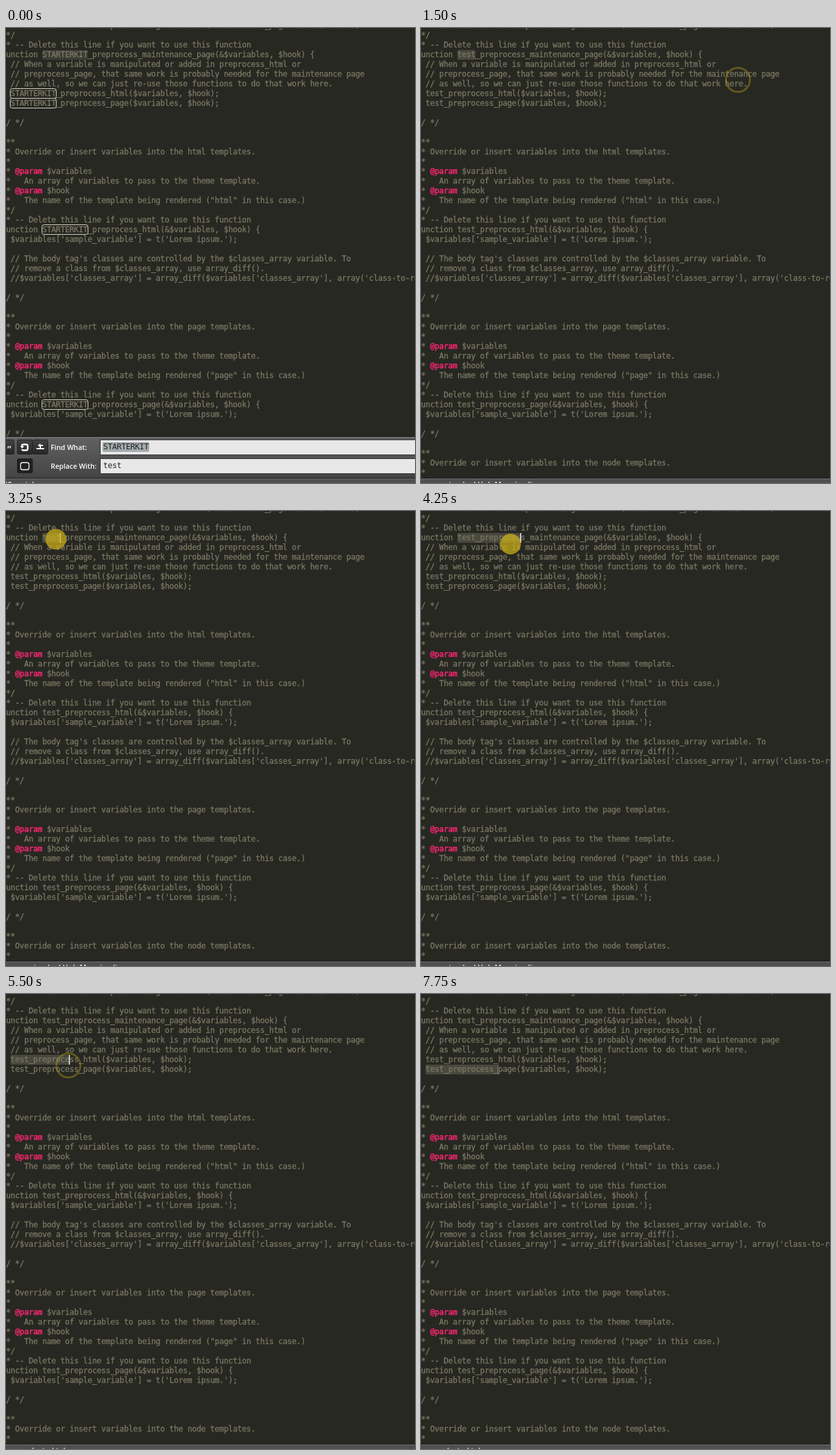
Recreate the animation shown at these times as an HTML page. Size 631 by 702 pixels, loop 8 s.

```html
<!DOCTYPE html>
<html lang="en">
<head>
<meta charset="utf-8">
<style>
html, body { margin: 0; width: 100%; height: 100%; overflow: hidden; background: #272822; }
svg { display: block; width: 631px; height: 702px; }
text { white-space: pre; }
.code { font: 12px "DejaVu Sans Mono", monospace; letter-spacing: -.2246px; fill: #7b7763; stroke: #7b7763; stroke-width: .3px; }
.tag { fill: #f92672; stroke: #f92672; stroke-width: .5px; }
.field { fill: #222; stroke: none; }
.label { font: 600 10.8px "Open Sans", sans-serif; fill: #fff; }
.status { font: 600 11.5px "Open Sans", sans-serif; fill: #f2f2f2; }
</style>
</head>
<body>
<svg viewBox="0 0 631 702">
  <defs>
    <linearGradient id="panelFill" x2="0" y2="1">
      <stop offset="0" stop-color="#626262"/><stop offset="1" stop-color="#444"/>
    </linearGradient>
    <linearGradient id="keyFill" x2="0" y2="1">
      <stop offset="0" stop-color="#424242"/><stop offset="1" stop-color="#262626"/>
    </linearGradient>
  </defs>
  <rect width="631" height="702" fill="#272822"/>
  <rect id="sel" height="15" rx="2"/>
  <g id="lines"></g>
  <g id="boxes" fill="none" stroke="#d6d6cc"></g>
  <rect id="caret" width="1.5" height="15" fill="#f8f8f0"/>
  <circle id="disc" r="16" fill="#d0b418" opacity=".7"/>
  <circle id="ring" r="18.5" fill="none" stroke="#b8a01c" stroke-width="3" opacity=".4"/>
  <g id="panel">
    <rect y="630" width="631" height="64" fill="url(#panelFill)"/>
    <path d="M0 630.5H631" stroke="#1c1c1c"/>
    <path d="M0 631.5H631" stroke="#808080"/>
    <g fill="url(#keyFill)" stroke="#222">
      <rect x="-12" y="635.5" width="24.5" height="22" rx="2"/>
      <rect x="17.5" y="635.5" width="23.5" height="22" rx="2"/>
      <rect x="41" y="635.5" width="23.5" height="22" rx="2"/>
      <rect x="17.5" y="664.5" width="23.5" height="22" rx="2" fill="#202020"/>
    </g>
    <text class="label" x="2" y="655" style="font-size:15px">”</text>
    <rect x="24.5" y="642.5" width="9" height="9" rx="2.5" fill="none" stroke="#fff" stroke-width="2.4"/>
    <path d="M22 645H28V650H22Z" fill="#303030"/>
    <path d="M22 645H28L25 649Z" fill="#fff"/>
    <path d="M47 649H59M53 649V644H57" fill="none" stroke="#fff" stroke-width="2"/>
    <path d="M53 641V647L49 644Z" fill="#fff"/>
    <rect x="22.5" y="670.5" width="13" height="11" rx="3" fill="none" stroke="#fff" stroke-width="1.3"/>
    <text class="label" x="69" y="651">Find What:</text>
    <text class="label" x="69" y="680">Replace With:</text>
    <g fill="#e8e8e8" stroke="#333">
      <rect x="145.5" y="635.5" width="490" height="23"/>
      <rect x="145.5" y="664.5" width="490" height="23"/>
    </g>
    <rect x="149" y="639" width="72" height="15" rx="2" fill="#a4abad"/>
    <text class="code field" x="150" y="650">STARTERKIT</text>
    <text class="code field" x="150" y="679">test</text>
  </g>
  <rect y="694" width="631" height="8" fill="#505050"/>
  <path d="M0 694.5H631" stroke="#1a1a1a"/>
  <path d="M0 695.5H631" stroke="#6e6e6e"/>
  <text id="status" class="status" y="708"></text>
</svg>
<script>
const $ = id => document.getElementById(id);
const NS = 'http://www.w3.org/2000/svg';
const COL = 7, ROW = 15, STEP = 250, LOOP = 8000;

const block = kind => `**
* Override or insert variables into the ${kind} templates.
*
* @param $variables
*   An array of variables to pass to the theme template.
* @param $hook
*   The name of the template being rendered ("${kind}" in this case.)
*/
* -- Delete this line if you want to use this function
unction %_preprocess_${kind}(&$variables, $hook) {
 $variables['sample_variable'] = t('Lorem ipsum.');
`;
const code = `*   The name of the template being rendered ("maintenance_page" in this case.)
*/
* -- Delete this line if you want to use this function
unction %_preprocess_maintenance_page(&$variables, $hook) {
 // When a variable is manipulated or added in preprocess_html or
 // preprocess_page, that same work is probably needed for the maintenance page
 // as well, so we can just re-use those functions to do that work here.
 %_preprocess_html($variables, $hook);
 %_preprocess_page($variables, $hook);

/ */

${block('html')}
 // The body tag's classes are controlled by the $classes_array variable. To
 // remove a class from $classes_array, use array_diff().
 //$variables['classes_array'] = array_diff($variables['classes_array'], array('class-to-remove'));

/ */

${block('page')}
/ */

**
* Override or insert variables into the node templates.
*`.split('\n');

function set(el, attrs) {
  for (const k in attrs) el.setAttribute(k, attrs[k]);
}
function add(parent, name, attrs) {
  const el = document.createElementNS(NS, name);
  set(el, attrs);
  return parent.appendChild(el);
}
const show = (el, on) => el.setAttribute('visibility', on ? 'visible' : 'hidden');
const clamp = v => Math.min(1, Math.max(0, v));
const easeOut = p => 1 - (1 - p) ** 2;
const lerp = (a, b, f) => a.map((v, i) => v + (b[i] - v) * f);

const named = [];
code.forEach((line, i) => {
  const el = add($('lines'), 'text', { class: 'code', x: 0, y: i * ROW });
  if (line.includes('@param')) {
    el.textContent = '* ';
    add(el, 'tspan', { class: 'tag' }).textContent = '@param';
    el.append(line.slice(8));
  } else el.textContent = line;
  const at = line.indexOf('%');
  if (at < 0) return;
  named.push({ el, line });
  if (i > 3) add($('boxes'), 'rect', { x: at * COL - .5, y: i * ROW - 11.5, width: 71, height: 15, rx: 3 });
});

// The pointer enters, drags over three names in turn, then leaves
const FULL = 'test_preprocess_'.length;
const enter = { time: 1500, pos: [489, 80] };
const leave = { time: 7500, pos: [261, 184] };
const drags = [
  { press: 2250, start: 3000, span: 1930, hold: 2250, row: 3, col: 8, from: [53.5, 40.5], to: [150, 52.5] },
  { press: 5250, start: 5250, span: 440, hold: STEP, row: 7, col: 1, from: [10, 103], to: [116, 112] },
  { press: 6500, start: 6500, span: 570, hold: STEP, row: 8, col: 1, from: [20, 110], to: [101, 138] }
];
const reach = (d, t) => easeOut(clamp((t - d.start) / d.span));

function pointerAt(t) {
  const i = drags.findLastIndex(d => t >= d.press);
  const last = drags[i], next = drags[i + 1];
  const end = last ? last.start + last.span : enter.time;
  if (last && t < end) return lerp(last.from, last.to, reach(last, t));
  const goal = next ? next.press : leave.time;
  return lerp(last ? last.to : enter.pos, next ? next.from : leave.pos, clamp((t - end) / (goal - end)));
}

// Selected text: row, column, length and caret opacity
function selectionAt(t, word) {
  const d = drags.findLast(d => t >= d.press + (d.start > d.press ? STEP : 0));
  if (!d) return { row: 3, col: 8, len: word.length, blink: t < 500 ? 0 : clamp(2 - t / 500) };
  const idle = Math.max(0, t - d.start - d.span);
  const blink = .5 + .5 * Math.cos(Math.PI * idle / 500);
  return { row: d.row, col: d.col, len: Math.round(FULL * reach(d, t)), blink };
}

let lastWord;
function draw(time) {
  const t = Math.floor(time % LOOP / STEP) * STEP;
  const finding = t < 500;
  const word = finding ? 'STARTERKIT' : 'test';
  if (word !== lastWord) {
    for (const { el, line } of named) el.textContent = line.replace('%', word);
    lastWord = word;
  }
  show($('panel'), finding);
  show($('boxes'), finding);

  const { row, col, len, blink } = selectionAt(t, word);
  const x = col * COL, y = row * ROW - 11;
  set($('sel'), { x, y, width: len * COL, fill: finding ? '#3c3d35' : '#49483e' });
  set($('caret'), { x: x + len * COL - 1, y, opacity: blink });

  const [cx, cy] = pointerAt(t);
  const pressed = drags.some(d => t >= d.press && t < d.press + d.hold);
  const moving = t >= enter.time && t <= leave.time;
  for (const id of ['disc', 'ring']) set($(id), { cx, cy });
  show($('disc'), pressed);
  show($('ring'), moving && !pressed);

  $('status').textContent = finding ? '20 matches' : t < 5250 ? 'untracked Hub Mapping lines' : 'selected tab';
  set($('status'), { x: finding ? -4 : 28 });
}
function tick(now) {
  draw(now);
  requestAnimationFrame(tick);
}
draw(0);
requestAnimationFrame(tick);
</script>
</body>
</html>
```
